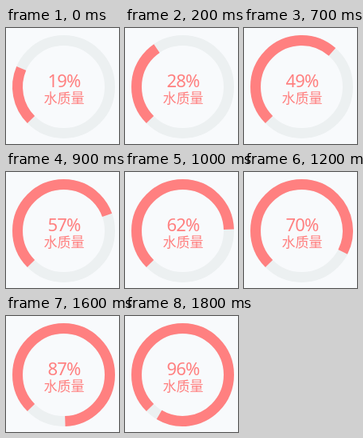
Animation, 142 px wide and 145 px high, one loop 2.9 s. Source, as an HTML page with a canvas:

```html
<!DOCTYPE html>
<html lang="zh">
<head>
<meta charset="utf-8">
<title>水质量</title>
<style>
  html, body { margin: 0; width: 100%; height: 100%; overflow: hidden; background: #f8fafc; }
  canvas { display: block; width: 142px; height: 145px; }
</style>
</head>
<body>
<canvas id="gauge"></canvas>
<script>
const W = 142, H = 145;
const LOOP = 2900, STEP = 100, STEPS = 18;
const FIRST = 19, RATE = 4.26;
const CX = 72.5, CY = 73.5, RADIUS = 58, THICK = 13;
const START = Math.PI * 0.75;
const RED = '#ff8080', TRACK = '#ecf0f1', BG = '#f8fafc';

const canvas = document.getElementById('gauge');
const ctx = canvas.getContext('2d');
const ratio = window.devicePixelRatio || 1;
canvas.width = W * ratio;
canvas.height = H * ratio;
ctx.scale(ratio, ratio);

function ring(color, share) {
  ctx.beginPath();
  ctx.arc(CX, CY, RADIUS, START, START + share * Math.PI * 2);
  ctx.lineWidth = THICK;
  ctx.strokeStyle = color;
  ctx.stroke();
}

function label(text, font, y, spacing) {
  ctx.font = font;
  ctx.letterSpacing = spacing;
  ctx.fillText(text, 73, y);
}

function draw(time) {
  const step = Math.min(STEPS, Math.floor((time % LOOP) / STEP));
  const percent = Math.round(FIRST + RATE * step);

  ctx.fillStyle = BG;
  ctx.fillRect(0, 0, W, H);
  ring(TRACK, 1);
  ring(RED, percent / 100);

  ctx.fillStyle = RED;
  ctx.textAlign = 'center';
  ctx.textBaseline = 'alphabetic';
  label(percent + '%', "200 extra-condensed 22px 'Noto Sans', 'Open Sans', sans-serif", 74, '-0.8px');
  label('水质量', "400 17px 'Noto Sans CJK SC', 'Noto Sans CJK', sans-serif", 94, '0px');
}

const begin = performance.now();
function tick() {
  draw(performance.now() - begin);
  requestAnimationFrame(tick);
}
tick();
</script>
</body>
</html>
```
